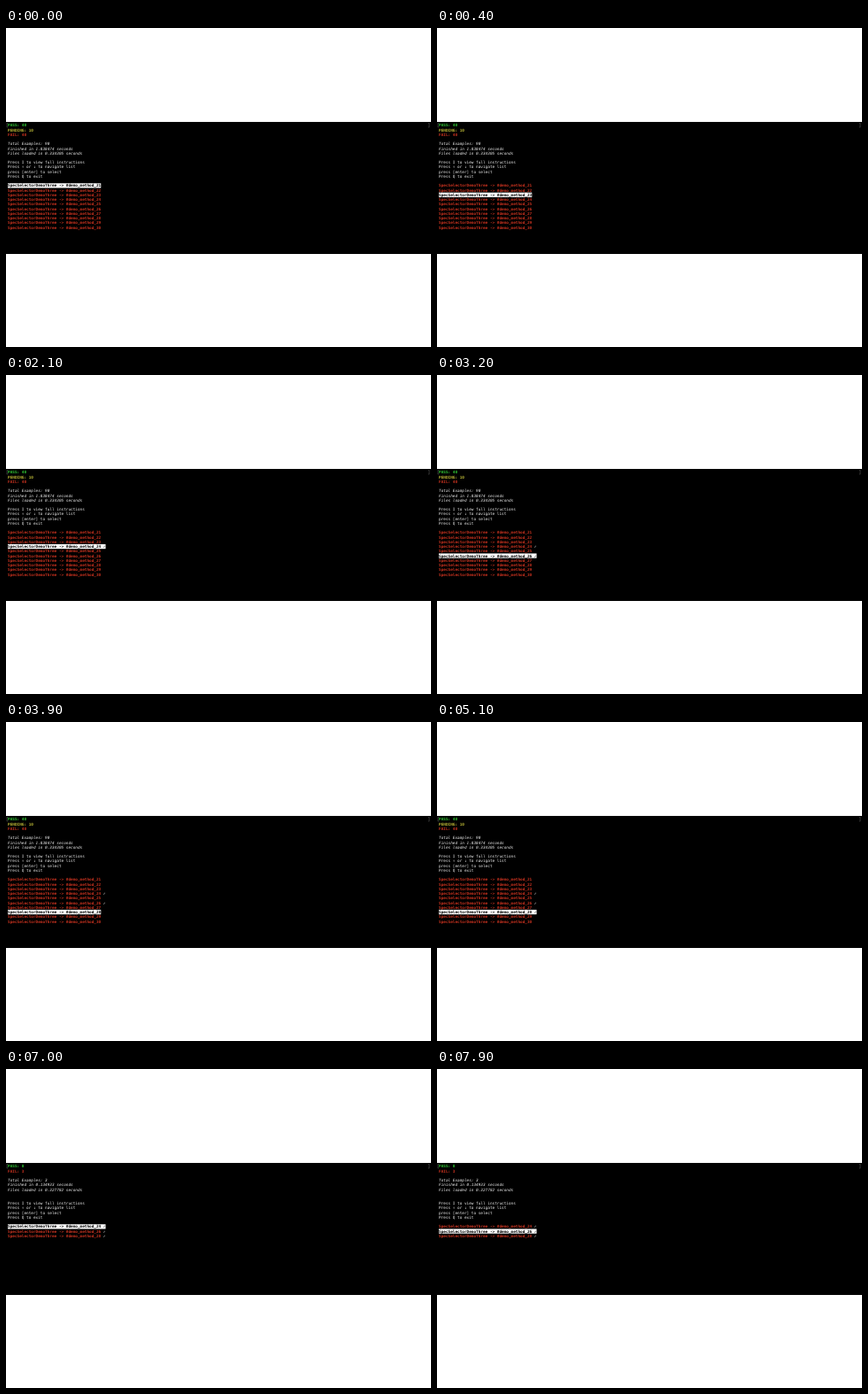
Recreate the animation shown at these times as an HTML page with a canvas. Size 480 by 360 pixels, loop 8 s.

```html
<!DOCTYPE html>
<html lang="en">
<head>
<meta charset="utf-8">
<title>Terminal test selector</title>
<style>
  html, body { margin: 0; width: 100%; height: 100%; overflow: hidden; background: #fff; }
  canvas { display: block; }
</style>
</head>
<body>
<canvas id="stage" width="480" height="360"></canvas>
<script>
const ctx = document.getElementById('stage').getContext('2d');
const LOOP = 8000, LEFT = 2, TOP = 109.8, CELL = 2.631, LINE = 5.235;
const GREEN = '#31c834', YELLOW = '#bcb936', RED = '#c8321f', WHITE = '#f2f2f2';
const LIST_ROW = 13;

// [time, selected method]
const moves = [[0, 21], [100, 22], [300, 23], [500, 24], [2300, 25], [2500, 26], [3700, 27], [3900, 28]];
// method -> time it gets its check mark
const checks = { 24: 1800, 26: 3100, 28: 4500 };
const CLEAR = 5400, RERUN = 6000, RESULTS = 6200, NEXT = 7900;

function write(text, row, color, style = '', col = 0) {
  ctx.font = `${style} 4.37px "DejaVu Sans Mono", monospace`;
  ctx.fillStyle = color;
  [...text].forEach((ch, i) => ctx.fillText(ch, LEFT + (col + i) * CELL, TOP + row * LINE + 1.55));
}

function counts(lines) {
  lines.forEach(([text, color], row) => write(text, row, color, 'bold'));
}

function summary(row, total, finished, loaded) {
  [`Total Examples: ${total}`, `Finished in ${finished} seconds`, `Files loaded in ${loaded} seconds`]
    .forEach((text, i) => write(text, row + i, WHITE, 'italic'));
  ['Press I to view full instructions', 'Press ↑ or ↓ to navigate list', 'press [enter] to select', 'Press Q to exit']
    .forEach((text, i) => write(text, 8 + i, WHITE));
}

function list(methods, selected, isChecked) {
  methods.forEach((n, i) => {
    const row = LIST_ROW + i, active = n === selected, checked = isChecked(n);
    if (active) {
      ctx.fillStyle = '#fff';
      ctx.fillRect(LEFT, TOP + (row - 0.5) * LINE, CELL * (checked ? 42 : 40), LINE);
    }
    write(`SpecSelectorDemoThree -> #demo_method_${n}`, row, active ? '#000' : RED, 'bold');
    if (checked) write('✓', row, active ? '#000' : '#fff', 'bold', 41);
  });
}

function terminal() {
  ctx.fillStyle = '#fff';
  ctx.fillRect(0, 0, 480, 360);
  ctx.fillStyle = '#000';
  ctx.fillRect(0, 106, 480, 149);
  ctx.strokeStyle = '#666';
  ctx.lineWidth = 0.5;
  ctx.beginPath();
  for (const [x, dx] of [[1, 1], [478, -1]]) {
    ctx.moveTo(x + dx, 107.5);
    ctx.lineTo(x, 107.5);
    ctx.lineTo(x, 112);
    ctx.lineTo(x + dx, 112);
  }
  ctx.stroke();
}

function draw(t) {
  terminal();
  if (t < CLEAR) {
    counts([['PASS: 40', GREEN], ['PENDING: 10', YELLOW], ['FAIL: 40', RED]]);
    summary(4, 90, '1.838474', '0.334305');
    const selected = moves.filter(([start]) => t >= start).pop()[1];
    list(Array.from({ length: 10 }, (_, i) => 21 + i), selected, n => t >= checks[n]);
  } else if (t >= RERUN) {
    const done = t >= RESULTS;
    counts([['PASS: 0', GREEN], [`FAIL: ${done ? 3 : 0}`, RED]]);
    if (done) {
      summary(3, 3, '0.134933', '0.327782');
      list([24, 26, 28], t < NEXT ? 24 : 26, () => true);
    }
  }
}

function tick() {
  draw(performance.now() % LOOP);
  requestAnimationFrame(tick);
}
tick();
</script>
</body>
</html>
```
